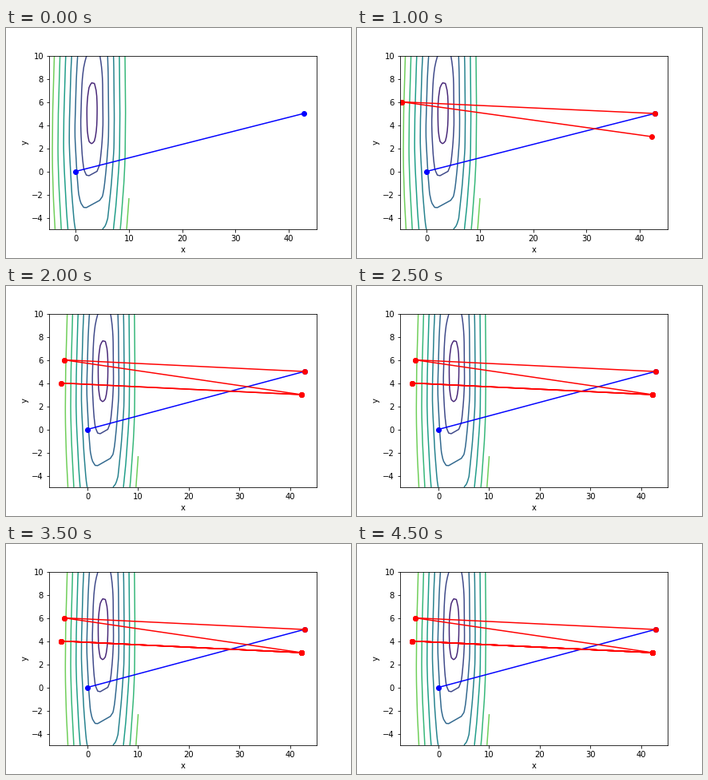
Recreate the animation shown at these times as a matplotlib script. Size 432 px wide and 288 px high, loop 5 s.

```python
import numpy as np
import matplotlib.pyplot as plt
from matplotlib.animation import FuncAnimation

FRAMES = 10

# Evenly spaced samples of the line 3 * pos + 5 with a wavy deviation
index = np.arange(19)
pos = 0.525 * (index - 9) - 0.25
noise = -2 * np.cos(np.radians(75 * index))
target = 3 * pos + 5 + noise


def loss(x, y):
    fit = x[..., None] * pos + y[..., None]
    return np.abs(fit - target).sum(axis=-1)


def descend(steps):
    """Subgradient descent on the absolute error with unit step size."""
    path = [np.zeros(2)]
    for _ in range(steps):
        x, y = path[-1]
        sign = np.sign(x * pos + y - target)
        path.append(path[-1] - [sign @ pos, sign.sum()])
    return np.array(path)


path = descend(FRAMES)

fig, ax = plt.subplots(figsize=(6, 4), dpi=72)
fig.subplots_adjust(left=0.125, right=0.9, bottom=0.125, top=0.88)

grid = np.linspace(-5, 10, 31)
gx, gy = np.meshgrid(grid, grid)
ax.contour(gx, gy, loss(gx, gy), levels=np.arange(50, 351, 50),
           cmap="viridis", vmin=0, vmax=450)
ax.set_xlabel("x")
ax.set_ylabel("y")
ax.set_ylim(-5, 10)

segments = [ax.plot(*path[i:i + 2].T, "o-", color="red" if i else "blue")[0]
            for i in range(FRAMES)]


def draw(frame):
    for i, seg in enumerate(segments):
        seg.set_visible(i <= frame)
    xs = path[:frame + 2, 0]
    low, high = min(xs.min(), -5), xs.max()
    pad = 0.05 * (high - low)
    # The contour edge carries no margin until the path passes it
    ax.set_xlim(low - pad if low < -5 else -5, high + pad)
    return segments


anim = FuncAnimation(fig, draw, frames=FRAMES, interval=500,
                     init_func=lambda: draw(0), repeat=True, repeat_delay=0)
plt.show()
```
